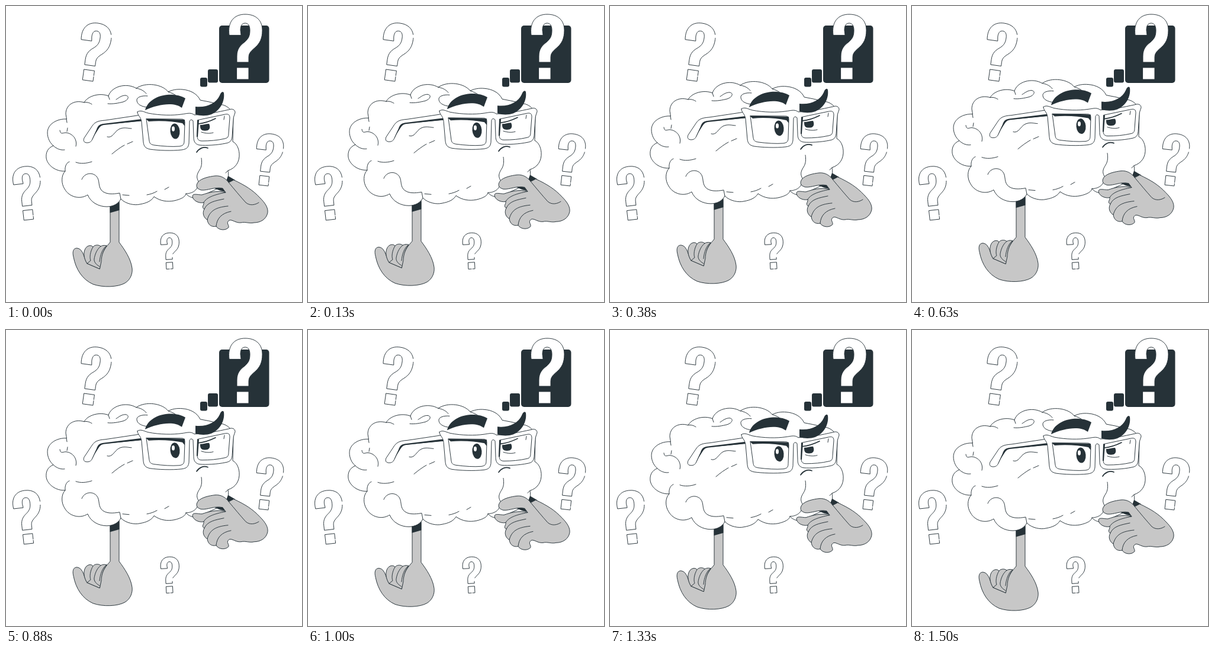
Write an HTML page that moves like this. It is 500 by 500 pixels and loops after 1.54 s.

```html
<!DOCTYPE html>
<html lang="en">
<head>
<meta charset="utf-8">
<style>
  html, body { margin: 0; height: 100%; overflow: hidden; background: #fff; }
  svg { display: block; width: 100vw; height: 100vh; }
  .line { fill: none; }
  .white { fill: #fff; }
  .gray { fill: #c7c7c7; }
  .dark { fill: #263238; stroke: none; }
</style>
</head>
<body>
<svg viewBox="0 0 500 500" stroke="#263238" stroke-width=".95" stroke-linecap="round" stroke-linejoin="round">
  <defs>
    <g id="question">
      <path pathLength="100" vector-effect="non-scaling-stroke" d="M1 35C-2 13 9 0 28 0C47 0 57 11 57 27C57 42 52 49 46 55C38 62 34 65 34 73V81H14V71C14 59 19 53 27 47C34 41 36 36 36 27C36 19 33 15 28 15C22 15 20 20 20 27L21 35Z"/>
      <path vector-effect="non-scaling-stroke" d="M14 90H34V110H14Z"/>
    </g>
  </defs>

  <g class="dark">
    <rect x="360" y="33" width="84.500" height="97" rx="5"/>
    <rect x="341" y="107" width="17" height="22.500" rx="3"/>
    <rect x="328" y="121" width="12" height="15.500" rx="3"/>
  </g>
  <g class="white">
    <use href="#question" transform="translate(376 14)"/>
    <g stroke-dasharray="26 2 72 0">
      <use href="#question" transform="translate(130.500 25.500) rotate(8) scale(.895)"/>
      <use href="#question" transform="translate(8.700 273.600) rotate(-6.500) scale(.82)"/>
      <use href="#question" transform="translate(425.700 213.500) rotate(6.400) scale(.8)"/>
      <use href="#question" transform="translate(260 384) rotate(-3) scale(.554)"/>
    </g>
  </g>

  <g id="brain">
    <!-- standing arm -->
    <path class="gray" d="M176 330V398C170 405 163 413 161 424L158 443L137 434C132 427 131 409 120 408C113 408 112 415 114 423C118 444 129 461 147 469C164 475 189 474 201 467C211 461 214 450 213 442C211 426 200 410 191 398V328Z"/>
    <path class="gray" d="M158 443L137 434C133 428 130 419 133 411C136 403 144 402 147 406C150 402 157 402 160 405C163 403 167 403 170 404C163 413 161 424 161 430Z"/>
    <path class="line" d="M147 406C142 414 141 424 143 429L137 434M160 405C153 410 150 420 149 426C148 432 154 437 158 439M170 404C163 408 159 420 158 431"/>
    <path class="dark" d="M175.500 330H191.500V344L175.500 348.500Z"/>

    <path class="white" d="M102 190C87 189 70 198 70 213C70 222 74 230 80 235C70 239 67 247 68 256C70 268 84 279 100 278C93 285 93 299 99 308C106 321 124 327 138 318C143 331 157 338 170 338C181 338 190 333 194 325C203 334 218 336 226 334C238 332 246 328 250 321C261 329 273 330 284 328C297 325 303 321 304 316C308 321 314 323 321 324L374 300C376 290 376 283 375 277C388 273 395 262 394 248C393 238 389 231 383 228L384 185C381 172 371 165 358 165C347 161 337 160 328 158C323 147 311 141 298 140C288 139 280 141 274 144C264 131 236 127 220 138C203 128 178 135 173 151C158 145 138 151 132 162C115 157 101 166 101 181Z"/>
    <path class="line" d="M304 316C317 316 326 308 325 295C320 287 324 281 327 276C331 270 331 263 330 256M102 190L103 196M91 209C92 217 96 213 101 213C113 214 121 225 118 236M80 235C85 240 92 243 99 242M100 278C99 270 102 264 107 262M118 263C126 266 136 265 145 262M128 292C132 281 146 279 153 287C159 294 155 302 161 310C168 318 181 317 192 315L194 325M197 318L208 319M238 318C244 317 250 315 255 312M268 309L275 305M132 162C138 161 142 163 145 165M172 164C180 165 190 163 198 161C207 158 209 151 202 150C195 150 191 154 186 157M173 151L175 157M220 138C227 139 233 142 237 147M239 151C229 150 220 153 221 159C222 166 230 169 238 170M171 220C180 223 183 211 191 207C199 203 207 206 212 206M179 249C186 243 193 238 200 234M205 232L214 228M103 211L104 205M274 144C280 146 285 148 288 151M375 277L371 281"/>

    <!-- glasses -->
    <path class="white" d="M228 183L168 192C153 193 149 196 144 204L132 222C130 227 132 230 137 230C142 230 144 228 146 224L154 207C156 202 159 200 164 199L229 193Z"/>
    <path class="dark" d="M144 227L153 208C155 201 158 199 164 198L229 190V193L165 200C160 201 158 204 156 207L149 218Z"/>
    <path class="white" fill-rule="evenodd" d="M222 178C227 174 233 178 240 180C260 184 282 184 296 182C305 181 312 178 318 183C337 183 358 178 377 174C382 172 387 174 387 179C386 183 384 186 384 191L382 220C381 228 377 230 371 231C357 234 338 235 327 234C320 233 317 228 317 221L316 193C313 190 311 191 310 194L309 231C308 239 304 241 297 242C280 244 257 243 243 241C235 239 233 236 232 229L229 195C228 186 222 184 222 178ZM237 190L242 227C243 232 245 233 250 234C265 236 280 237 293 236C299 235 301 233 301 227L302 196C302 191 300 190 296 190ZM324 192L323 218C323 224 325 227 331 227C344 227 357 226 370 223C375 222 376 219 376 214L378 188C378 182 375 181 370 182Z"/>
    <path class="dark" d="M236 189.500L265 190L302 191V202L298 197C282 194 262 192 241 194ZM323 191.500L326 192L324 220H322Z"/>
    <g class="dark">
      <ellipse cx="285.500" cy="210.500" rx="8" ry="13" transform="rotate(-5 285.500 210.500)"/>
      <path d="M328 200C333 200 338 198 343 198C345 202 345 207 341 209C337 210 332 210 330 208C328 206 328 203 328 200Z"/>
    </g>
    <ellipse cx="282.500" cy="206.500" rx="2.500" ry="4.200" fill="#fff" stroke="none"/>
    <path class="line" stroke-width="1.600" d="M325 198C335 197 344 194 354 189"/>
    <path class="line" d="M330 212C336 214 343 215 350 213M369 185L368 191"/>

    <!-- brows and mouth -->
    <path class="dark" d="M235 175C238 162 252 151 272 149C284 148 295 150 303 155L297 171C285 161 258 164 235 175ZM320 169C340 171 355 163 361 150C363 144 367 142 368 146C370 161 361 176 347 182C338 185 329 185 320 182Z"/>
    <path class="line" stroke-width="1.700" d="M322 246C326 240 333 236 341 239"/>

    <!-- thinking hand -->
    <path class="dark" d="M375 286L387 293L382 305L371 297ZM352 307L366 305L374 314L362 311Z"/>
    <path class="gray" d="M385 293C404 302 417 310 429 323C438 332 443 340 442 348C440 359 430 365 419 365C411 367 404 363 397 365C388 366 382 359 377 361C371 366 377 368 376 373C371 379 359 378 355 371C348 373 341 369 340 360C334 357 331 349 335 342C329 339 335 335 334 331C325 333 315 327 315 320C316 315 324 318 331 318C343 314 356 310 371 314L366 307C352 304 341 311 330 310C322 308 320 303 324 297C329 290 344 287 353 286C363 285 371 290 376 297Z"/>
    <path class="line" d="M376 297C386 309 396 321 405 331C412 337 421 335 427 331M335 342C340 330 354 328 368 325M340 360C344 345 354 339 375 337M355 371C356 358 364 349 380 346M334 331C338 323 350 318 371 314"/>
  </g>
</svg>
<script>
  const brain = document.getElementById("brain");
  const LOOP = 1540, CYCLE = 1500, LIFT = 10, REST = 1;

  function draw() {
    const phase = Math.min(performance.now() % LOOP, CYCLE) / CYCLE;
    const y = REST - LIFT * (1 - Math.abs(1 - 2 * phase));
    brain.setAttribute("transform", `translate(0 ${y})`);
    requestAnimationFrame(draw);
  }
  draw();
</script>
</body>
</html>
```
